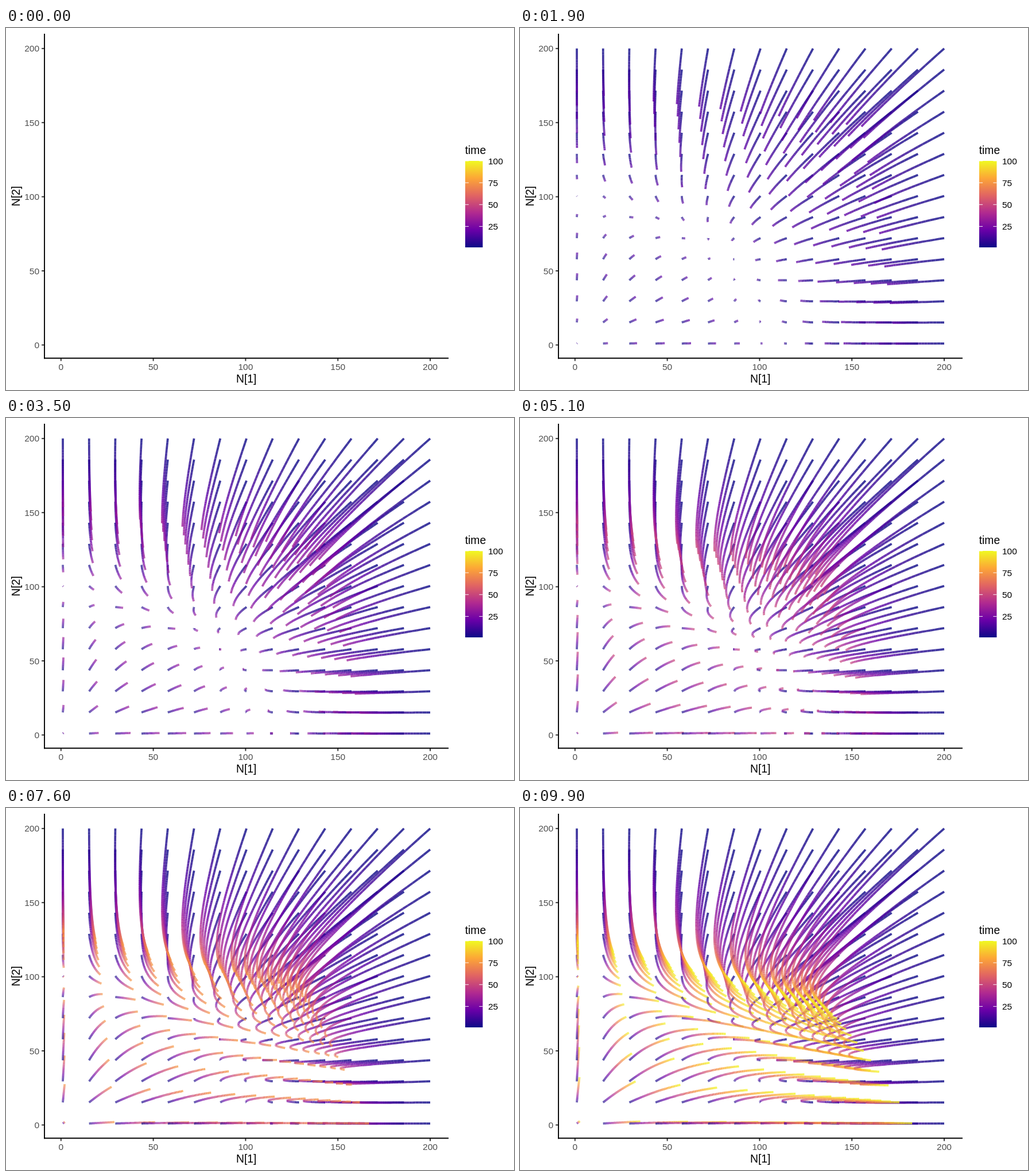
Write an HTML page with a canvas that moves like this. It is 885x632 px and loops after 10 s.

```html
<!DOCTYPE html>
<html lang="en">
<head>
<meta charset="utf-8">
<title>Phase plane</title>
<style>
  html, body { margin: 0; width: 100%; height: 100%; overflow: hidden; background: #fff; }
  canvas { display: block; }
</style>
</head>
<body>
<canvas id="plot" width="885" height="632"></canvas>
<script>
const W = 885, H = 632;
const STEPS = 100, STEP_MS = 100, GRID = 15;
const FONT = '"Liberation Sans", Arial, Helvetica, sans-serif';
const PANEL = { left: 67, right: 771, top: 10, bottom: 576.5 };
const BAR = { x: 800, y: 232, w: 30.5, h: 151 };
const STOPS = [[13, 8, 135], [106, 0, 168], [177, 42, 144],
               [225, 100, 98], [252, 166, 54], [240, 249, 33]];

const ctx = document.getElementById('plot').getContext('2d');

const px = n => 95.8 + n * 3.2161;
const py = n => 553.4 - n * 2.588;

function ramp(f) {
  const p = f * (STOPS.length - 1);
  const i = Math.min(Math.floor(p), STOPS.length - 2);
  const mix = STOPS[i].map((c, j) => Math.round(c + (STOPS[i + 1][j] - c) * (p - i)));
  return `rgb(${mix})`;
}

const colors = Array.from({ length: STEPS }, (_, i) => ramp(i / (STEPS - 1)));

// Two competitors; self-limitation of the first one weakens with time.
function orbit(n1, n2) {
  const pts = [];
  for (let t = 0; t < STEPS; t++) {
    pts.push([px(n1), py(n2)]);
    const self = 0.01 - 0.000075 * t;
    const g1 = 0.01 * (1 - self * n1 - 0.004 * n2);
    const g2 = 0.01 * (1 - 0.01 * n2 - 0.005 * n1);
    n1 += n1 * g1;
    n2 += n2 * g2;
  }
  return pts;
}

const orbits = [];
const start = i => 1 + 199 * i / (GRID - 1);
for (let i = 0; i < GRID; i++) {
  for (let j = 0; j < GRID; j++) orbits.push(orbit(start(i), start(j)));
}

function line(c, x1, y1, x2, y2) {
  c.beginPath();
  c.moveTo(x1, y1);
  c.lineTo(x2, y2);
  c.stroke();
}

function label(c, text, x, y, size, align, color) {
  c.font = `${size}px ${FONT}`;
  c.textAlign = align;
  c.fillStyle = color;
  c.fillText(text, x, y);
}

function drawAxes(c) {
  const { left, right, top, bottom } = PANEL;
  c.lineWidth = 1.89;
  c.strokeStyle = '#333';
  for (let v = 0; v <= 200; v += 50) {
    line(c, px(v), bottom, px(v), bottom + 4.9);
    line(c, left - 4.9, py(v), left, py(v));
    label(c, v, px(v), 596.5, 15.5, 'center', '#4d4d4d');
    label(c, v, 58, py(v) + 5.6, 15.5, 'right', '#4d4d4d');
  }
  c.strokeStyle = '#000';
  line(c, left, top, left, bottom + 0.9);
  line(c, left - 0.9, bottom, right, bottom);
  label(c, 'N[1]', 418.7, 619, 19.3, 'center', '#000');
  c.save();
  c.translate(23.5, 293.5);
  c.rotate(-Math.PI / 2);
  label(c, 'N[2]', 0, 0, 19.3, 'center', '#000');
  c.restore();
}

function drawLegend(c) {
  const { x, y, w, h } = BAR;
  const fill = c.createLinearGradient(0, y + h, 0, y);
  STOPS.forEach((_, i) => fill.addColorStop(i / 5, ramp(i / 5)));
  c.fillStyle = fill;
  c.fillRect(x, y, w, h);
  c.strokeStyle = '#fff';
  c.lineWidth = 0.95;
  for (let v = 25; v <= 100; v += 25) {
    const ty = y + h * (100 - v) / 99;
    line(c, x, ty, x + w / 5, ty);
    line(c, x + w * 0.8, ty, x + w, ty);
    label(c, v, 840, ty + 5.6, 15.5, 'left', '#000');
  }
  label(c, 'time', 799.7, 220, 19.3, 'left', '#000');
}

const backdrop = document.createElement('canvas');
backdrop.width = W;
backdrop.height = H;
const back = backdrop.getContext('2d');
back.fillStyle = '#fff';
back.fillRect(0, 0, W, H);
drawAxes(back);
drawLegend(back);

function draw(step) {
  ctx.globalAlpha = 1;
  ctx.drawImage(backdrop, 0, 0);
  ctx.globalAlpha = 0.8;
  ctx.lineWidth = 3.75;
  for (const pts of orbits) {
    for (let t = 0; t < step; t++) {
      ctx.strokeStyle = colors[t];
      line(ctx, ...pts[t], ...pts[t + 1]);
    }
  }
}

let shown = -1;
function tick() {
  const step = Math.floor(performance.now() / STEP_MS) % STEPS;
  if (step !== shown) {
    shown = step;
    draw(step);
  }
  requestAnimationFrame(tick);
}
tick();
</script>
</body>
</html>
```
